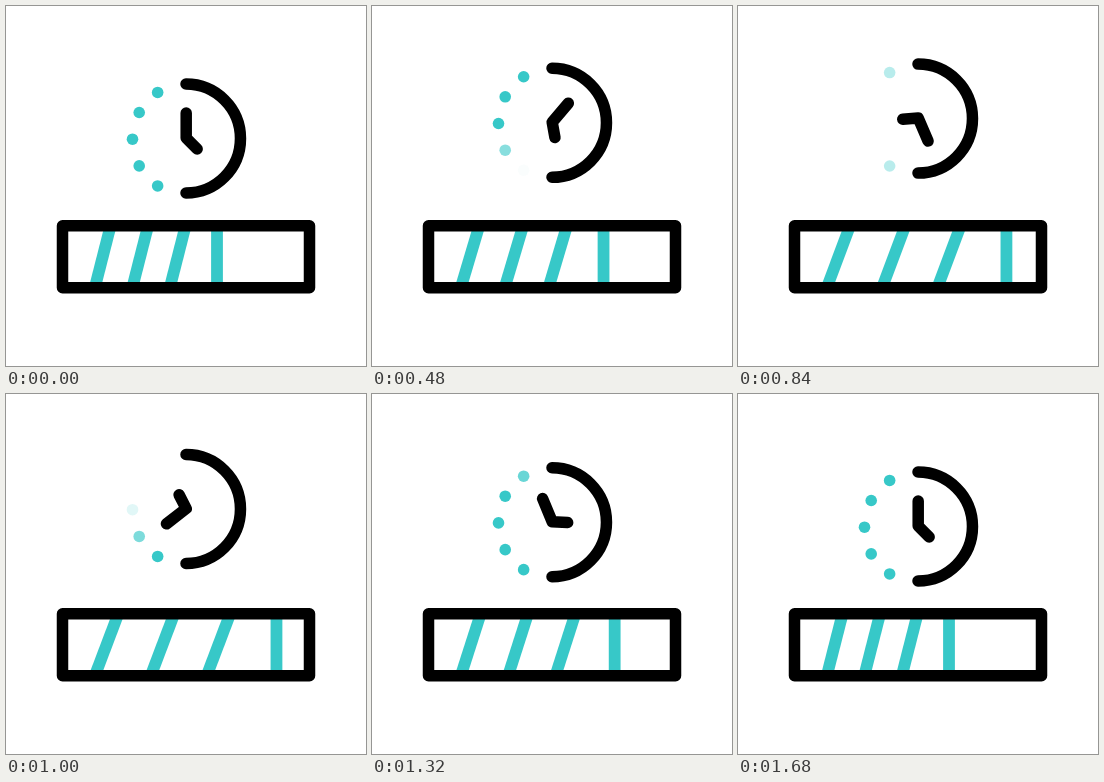
An HTML page for the animation above (1.72 s loop, 360 by 360 pixels).

```html
<!DOCTYPE html>
<html lang="en">
<head>
<meta charset="utf-8">
<title>Waiting</title>
<style>
  html, body { margin: 0; width: 100%; height: 100%; overflow: hidden; background: #fff; }
  svg { display: block; width: 100vw; height: 100vh; }
  .ink { fill: none; stroke: #000; stroke-width: 11.5; stroke-linecap: round; stroke-linejoin: round; }
  .bar { fill: none; stroke: #37c8c8; stroke-width: 11.8; }
  .dot { fill: #37c8c8; }
</style>
</head>
<body>
<svg viewBox="0 0 360 360">
  <g id="clock">
    <path class="ink" d="M180 78a54.5 54.5 0 0 1 0 109"/>
    <path class="ink" id="hands"/>
    <g id="dots"></g>
  </g>
  <g id="bars"></g>
  <rect class="ink" x="56.5" y="219.8" width="247" height="62"/>
</svg>
<script>
const LOOP = 1720, STEP = 40;
const $ = id => document.getElementById(id);
const clamp = v => Math.max(0, Math.min(1, v));
const ramp = (t, from, to) => clamp((t - from) / (to - from));

function add(parent, tag, attrs) {
  const el = document.createElementNS('http://www.w3.org/2000/svg', tag);
  for (const k in attrs) el.setAttribute(k, attrs[k]);
  return parent.appendChild(el);
}

// Same curve as CSS cubic-bezier(a, 0, b, 1), solved by bisection.
function ease(x, a, b) {
  let lo = 0, hi = 1;
  for (let i = 0; i < 24; i++) {
    const s = (lo + hi) / 2, r = 1 - s;
    if (3 * s * r * (r * a + s * b) + s * s * s < x) lo = s; else hi = s;
  }
  return lo * lo * (3 - 2 * lo);
}

const move = (t, from, to, a = .6, b = .55) => ease(ramp(t, from, to), a, b);

// Five dots on the open half of the dial, lowest first.
const dots = [0, 1, 2, 3, 4].map(i => {
  const a = (122 + 29 * i) * Math.PI / 180;
  return add($('dots'), 'circle', {
    class: 'dot', r: 5.8,
    cx: 180 + 53.5 * Math.cos(a), cy: 133.2 + 53.5 * Math.sin(a) * 1.03
  });
});

const bars = [0, 1, 2, 3].map(() => add($('bars'), 'path', { class: 'bar' }));

function tip(deg, len) {
  const a = deg * Math.PI / 180;
  return `${180.2 + len * Math.sin(a)} ${132 - len * Math.cos(a)}`;
}

function draw(t) {
  const lift = 20 * (move(t, 0, 640, .75, .6) - move(t, 800, 1600, .45, .5));
  $('clock').setAttribute('transform', `translate(0 ${-lift})`);

  const long = 360 * move(t, 0, 1600);
  const short = 135 + 360 * move(t, 0, 1680, .6, .59);
  $('hands').setAttribute('d', `M${tip(long, 25)}L180.2 132L${tip(short, 15.5)}`);

  dots.forEach((dot, i) => {
    const out = 300 + 105 * i, back = 770 + 100 * i;
    dot.setAttribute('opacity', 1 - ramp(t, out, out + 185) + ramp(t, back, back + 200));
  });

  const p = move(t, 0, 960, .62, .6) - move(t, 960, 1680, .53, .51);
  bars.forEach((bar, i) => {
    const slant = i < 3;
    const low = slant ? 88.8 + i * (37.5 + 18.5 * p) : 211 + 59.7 * p;
    const high = slant ? low + 15.8 + 7.7 * p : low;
    bar.setAttribute('d', `M${low} 281.8L${high} 219.8`);
  });
}

function tick() {
  draw(Math.floor(performance.now() % LOOP / STEP) * STEP);
  requestAnimationFrame(tick);
}
tick();
</script>
</body>
</html>
```
